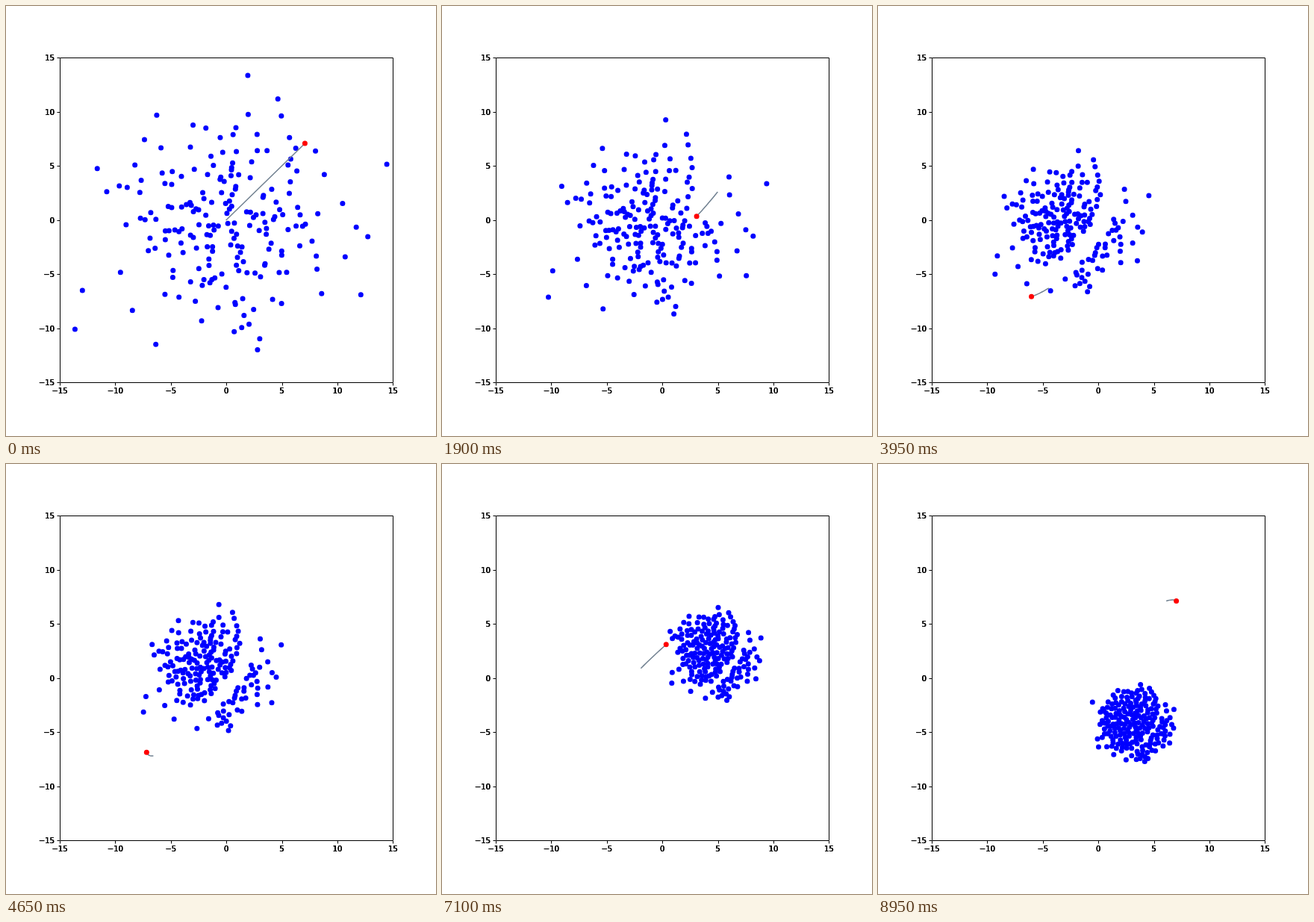
An HTML page with a canvas for the animation above (9 s loop, 576 by 576 pixels).

```html
<!DOCTYPE html>
<html lang="en">
<head>
<meta charset="utf-8">
<title>Swarm and predator</title>
<style>
  html, body { margin: 0; width: 100%; height: 100%; overflow: hidden; background: #fff; }
  canvas { display: block; width: 576px; height: 576px; }
</style>
</head>
<body>
<canvas id="stage" width="576" height="576"></canvas>
<script>
const ctx = document.getElementById('stage').getContext('2d');
const FRAMES = 180, FRAME_MS = 50, DOTS = 200, TRAIL = 10;
const toX = x => 72 + (x + 15) * 14.88;
const toY = y => 504 - (y + 15) * 14.496;

// The swarm's centre passes one of these points every LEG frames.
const LEG = 30;
const PATH = [[-.2, .1], [-.4, -.1], [-3.3, -1.4], [-1.9, .6], [2.7, 3.1], [4.8, 1.4], [3.2, -4.3]];

let seed = 0;
function random() {
  seed = (seed * 1664525 + 1013904223) % 4294967296;
  return seed / 4294967296;
}

// Normal spread: radii follow its quantiles, outermost dot first.
function startPositions() {
  return Array.from({ length: DOTS }, (_, i) => {
    const radius = 4.9 * Math.sqrt(-2 * Math.log((i + .5) / DOTS));
    const angle = -2.504 + i * 2.4 + 1.6 * random() * Math.min(i, 1);
    return [radius * Math.cos(angle), radius * Math.sin(angle)];
  });
}

// The predator runs round a thin ellipse lying on the diagonal.
function predator(frame) {
  if (frame < 0) return [0, 0];
  const angle = frame * Math.PI / 90;
  const along = 10 * Math.cos(angle), across = 2 * Math.sin(angle);
  return [(along + across) / Math.SQRT2, (along - across) / Math.SQRT2];
}

// Catmull-Rom curve through the path points
function centre(frame) {
  const i = Math.floor(frame / LEG), u = frame / LEG - i;
  const point = n => PATH[Math.max(0, Math.min(n, PATH.length - 1))];
  const [p, a, b, n] = [i - 1, i, i + 1, i + 2].map(point);
  return [0, 1].map(k => a[k] + u / 2 * (b[k] - p[k]
    + u * (2 * p[k] - 5 * a[k] + 4 * b[k] - n[k] + u * (3 * (a[k] - b[k]) + n[k] - p[k]))));
}

function mean(dots) {
  return [0, 1].map(k => dots.reduce((sum, dot) => sum + dot[k], 0) / dots.length);
}

// Dots repel each other, gather round their mean and flee the predator.
function advance(dots, frame) {
  const repel = .09 / DOTS, flee = .08, gather = .0105;
  const mid = mean(dots), [hx, hy] = predator(frame + 1);
  const next = dots.map(([x, y]) => {
    let vx = gather * (mid[0] - x), vy = gather * (mid[1] - y);
    for (const [ox, oy] of dots) {
      const dx = x - ox, dy = y - oy, push = repel / (dx * dx + dy * dy + .004);
      vx += dx * push;
      vy += dy * push;
    }
    const dx = x - hx, dy = y - hy, push = flee / (dx * dx + dy * dy + .02);
    return [x + vx + dx * push, y + vy + dy * push];
  });
  // Carry the whole swarm along its path.
  const now = centre(frame), then = centre(frame + 1), moved = mean(next);
  const shift = [0, 1].map(k => then[k] + (mid[k] - now[k]) * .95 - moved[k]);
  return next.map(([x, y]) => [x + shift[0], y + shift[1]]);
}

const swarm = [startPositions()];
for (let f = 0; f < FRAMES - 1; f++) swarm.push(advance(swarm[f], f));

function drawAxes() {
  ctx.strokeStyle = ctx.fillStyle = '#000';
  ctx.lineWidth = 1;
  ctx.lineCap = 'butt';
  ctx.strokeRect(72.5, 69.5, 446, 435);
  ctx.font = '10px "DejaVu Sans", sans-serif';
  ctx.beginPath();
  for (let value = -15; value <= 15; value += 5) {
    const x = Math.round(toX(value)), y = Math.round(toY(value));
    const label = String(value).replace('-', '\u2212');
    ctx.moveTo(x + .5, 505);
    ctx.lineTo(x + .5, 508.5);
    ctx.moveTo(72, y + .5);
    ctx.lineTo(68.5, y + .5);
    // Slightly shifted passes thicken the digits.
    for (const offset of [-.3, 0, .3]) {
      ctx.textAlign = 'center';
      ctx.fillText(label, toX(value) + offset, 519);
      ctx.textAlign = 'right';
      ctx.fillText(label, 65 + offset, y + 4);
    }
  }
  ctx.stroke();
}

function drawDot([x, y], color) {
  ctx.fillStyle = color;
  ctx.beginPath();
  ctx.arc(toX(x), toY(y), 3.5, 0, 2 * Math.PI);
  ctx.fill();
}

function drawTrail(frame) {
  ctx.strokeStyle = '#708090';
  ctx.lineWidth = 1.5;
  ctx.lineJoin = 'round';
  ctx.lineCap = 'square';
  ctx.beginPath();
  for (let f = frame - TRAIL + 1; f <= frame; f++) {
    const [x, y] = predator(f);
    ctx.lineTo(toX(x), toY(y));
  }
  ctx.stroke();
}

function draw() {
  const frame = Math.floor(performance.now() / FRAME_MS) % FRAMES;
  ctx.fillStyle = '#fff';
  ctx.fillRect(0, 0, 576, 576);
  for (const dot of swarm[frame]) drawDot(dot, '#00f');
  drawTrail(frame);
  drawDot(predator(frame), '#f00');
  drawAxes();
  requestAnimationFrame(draw);
}
draw();
</script>
</body>
</html>
```
